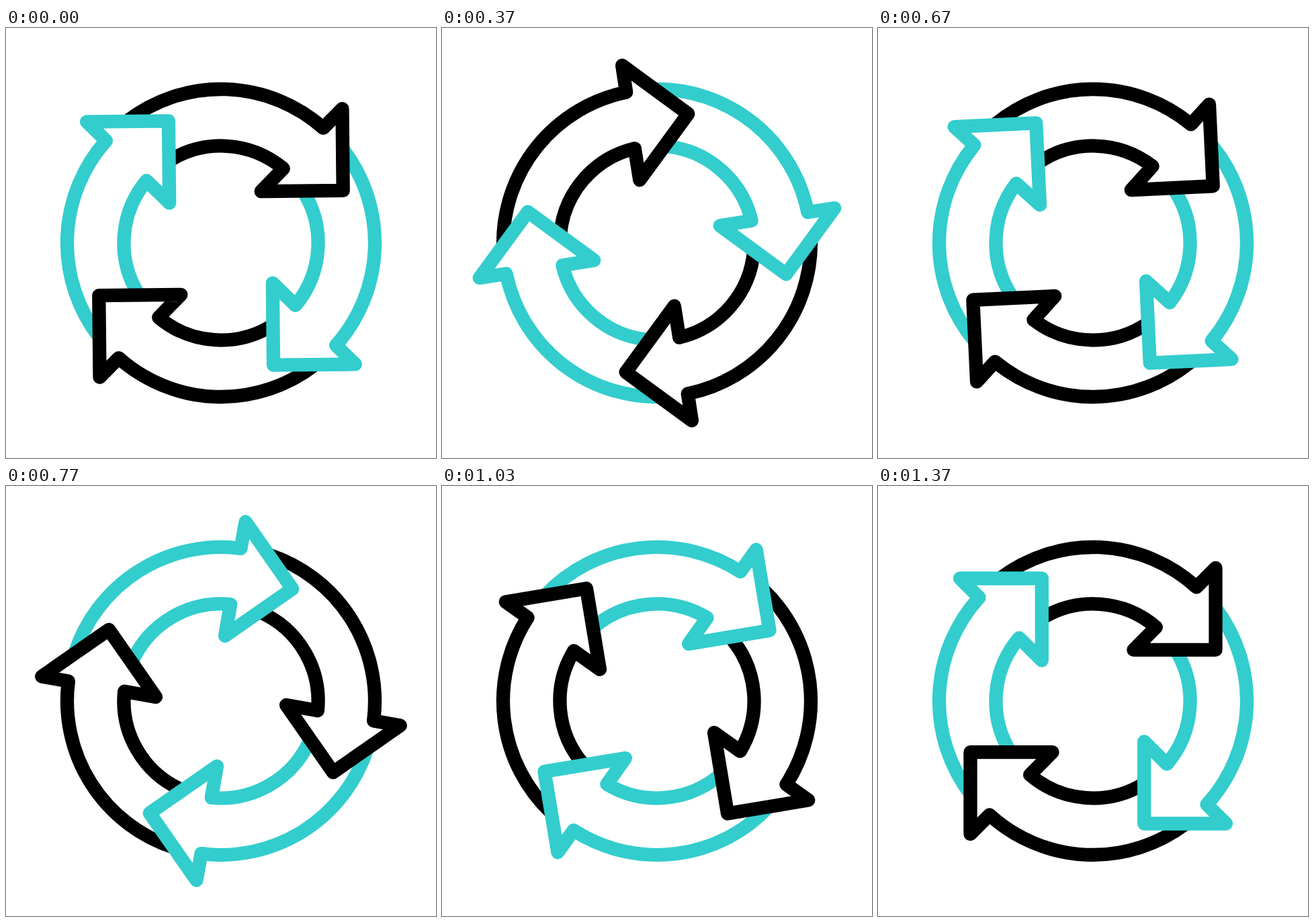
These frames come from a looping animation (640 px wide and 640 px high, 1670 ms). An HTML page:

```html
<!DOCTYPE html>
<html lang="en">
<head>
<meta charset="utf-8">
<title>Turning arrows</title>
<style>
  html, body { margin: 0; width: 100%; height: 100%; overflow: hidden; background: #fff; }
  svg { display: block; width: 100vw; height: 100vh; }
</style>
</head>
<body>
<svg viewBox="-320 -320 640 640">
  <g id="wheel" fill="none" stroke-width="20.3" stroke-linejoin="round"></g>
</svg>
<script>
const LOOP = 1670, STEP = 100 / 3;
const COLORS = ['#000', '#33cdcd'];
const OUTER = 229, INNER = 144.5;
const TIP = { x: 182.5, y: -76.2 };
const wheel = document.getElementById('wheel');

// Each tail starts under the head edge of the arrow behind it.
const tails =
  `M${-Math.sqrt(OUTER ** 2 - TIP.x ** 2)} ${-TIP.x} A${OUTER} ${OUTER} 0 0 1 154 -169.5` +
  `M${TIP.y} ${-Math.sqrt(INNER ** 2 - TIP.y ** 2)} A${INNER} ${INNER} 0 0 1 93.9 -109.9`;
const head = `M154 -169.5 L182.5 -198 L${TIP.x} ${TIP.y} L60.4 ${TIP.y} L93.9 -109.9`;

function addArrows(d, cap) {
  for (let i = 0; i < 4; i++) {
    const path = document.createElementNS('http://www.w3.org/2000/svg', 'path');
    path.setAttribute('d', d);
    path.setAttribute('stroke', COLORS[i % 2]);
    path.setAttribute('stroke-linecap', cap);
    path.setAttribute('transform', `rotate(${i * 90})`);
    wheel.append(path);
  }
}
addArrows(tails, 'butt');
addArrows(head, 'round');

// Cubic Bezier easing with flat ends; x1 and x2 are the handle times.
function ease(x, x1, x2) {
  let lo = 0, hi = 1;
  for (let i = 0; i < 30; i++) {
    const s = (lo + hi) / 2, r = 1 - s;
    if (3 * s * r * r * x1 + 3 * s * s * r * x2 + s ** 3 < x) lo = s; else hi = s;
  }
  return lo * lo * (3 - 2 * lo);
}

// Wind back, then spin forward a full turn and rest.
const BACK = -55.3, TURN = 13.6, END = 42;
function angle(n) {
  if (n >= END) return 0;
  if (n < TURN) return BACK * ease(n / TURN, 0.42, 0.58);
  return BACK + (360 - BACK) * ease((n - TURN) / (END - TURN), 0.467, 0.528);
}

function draw(ms) {
  const n = Math.floor((ms % LOOP + 3.5) / STEP) + 1;
  wheel.setAttribute('transform', `rotate(${angle(n)})`);
}

let start;
function tick(now) {
  start ??= now;
  draw(now - start);
  requestAnimationFrame(tick);
}
draw(0);
requestAnimationFrame(tick);
</script>
</body>
</html>
```
